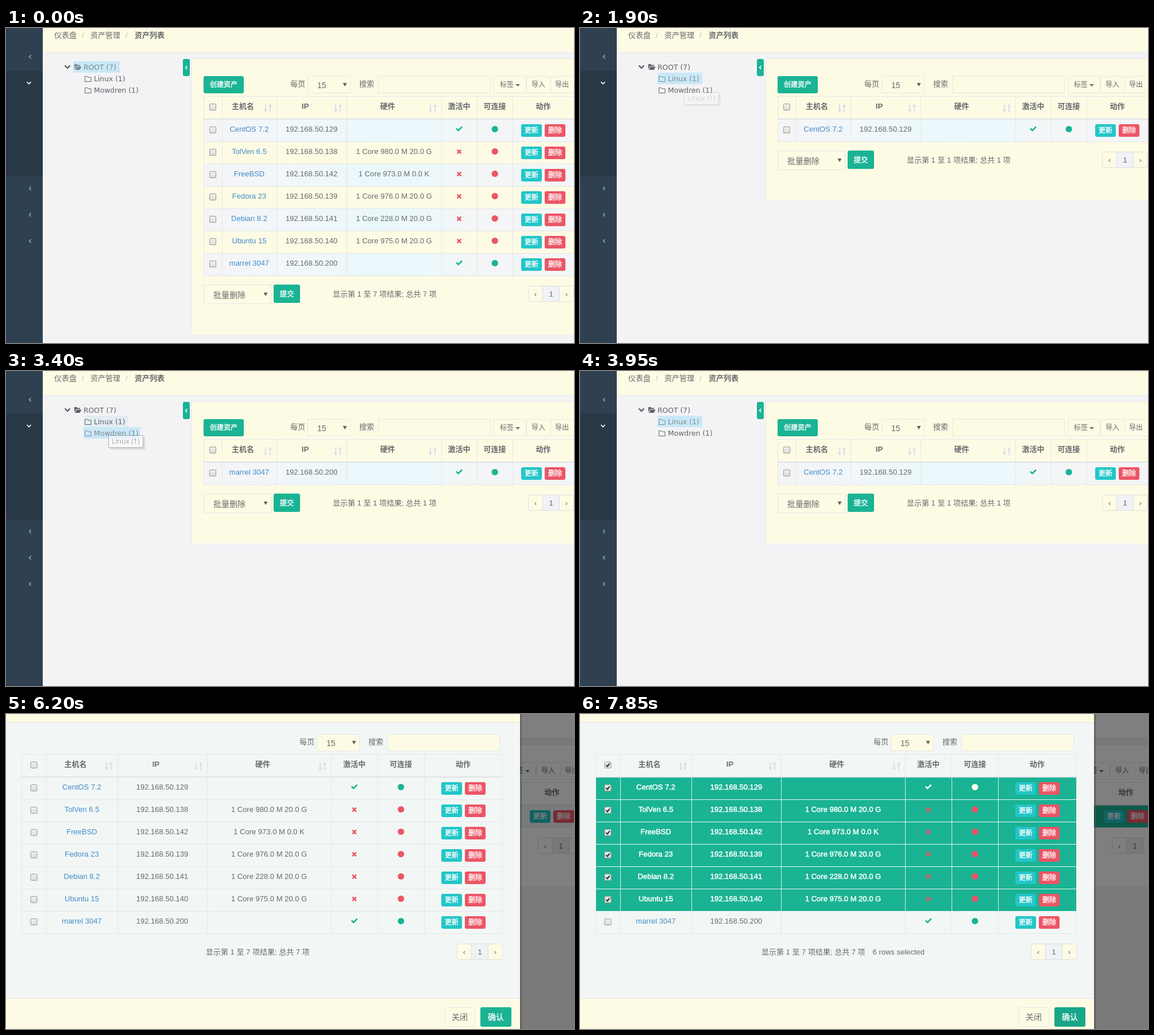
These frames come from a looping animation (989x550 px, 8000 ms). An HTML page:

```html
<!DOCTYPE html>
<html lang="zh">
<head>
<meta charset="utf-8">
<title>资产列表</title>
<style>
html, body { margin: 0; width: 100%; height: 100%; overflow: hidden; background: #f3f3f5; }
svg { display: block; width: 989px; height: 550px; }
text { font-family: 'Liberation Sans', 'Noto Sans CJK SC', 'Noto Sans CJK', sans-serif; white-space: pre; }
.tree { font-family: 'DejaVu Sans', sans-serif; }
.tip { font-family: 'Open Sans', sans-serif; }
.icon { fill: none; stroke-width: 2; }
</style>
</head>
<body>
<svg viewBox="0 0 989 550" xmlns="http://www.w3.org/2000/svg">
  <defs>
    <linearGradient id="stripe">
      <stop offset="0" stop-color="#f5f4f7"/><stop offset=".25" stop-color="#f0f7fa"/>
      <stop offset=".45" stop-color="#ebf8fb"/><stop offset=".63" stop-color="#ecf8fb"/>
      <stop offset=".7" stop-color="#f3f5f6"/><stop offset="1" stop-color="#f3f5f6"/>
    </linearGradient>
    <linearGradient id="check" x2="0" y2="1">
      <stop offset="0" stop-color="#f1f0ea"/><stop offset="1" stop-color="#dcdcda"/>
    </linearGradient>
  </defs>
  <g id="stage"></g>
</svg>
<script>
const LOOP = 8000, STEP = 50;
const GREEN = '#1ab394', CYAN = '#23c6c8', RED = '#ed5565', GREY = '#676a6c', LINE = '#e4e7ea';
const MAIN_COLS = [344, 376, 471, 593, 758, 820, 882, 989];
const MODAL_COLS = [27, 70, 194, 350, 566, 647, 728, 864];
const HEADS = ['主机名', 'IP', '硬件', '激活中', '可连接', '动作'];
const core = (ram, disk) => `1 Core ${ram} M ${disk}`;
const HOSTS = [
  ['CentOS 7.2', 129, '', true],
  ['TolVen 6.5', 138, core('980.0', '20.0 G')],
  ['FreeBSD', 142, core('973.0', '0.0 K')],
  ['Fedora 23', 139, core('976.0', '20.0 G')],
  ['Debian 8.2', 141, core('228.0', '20.0 G')],
  ['Ubuntu 15', 140, core('975.0', '20.0 G')],
  ['marrel 3047', 200, '', true]
];
const NODES = [
  { label: 'ROOT (7)', x: 117, w: 81 },
  { label: 'Linux (1)', x: 135, w: 78 },
  { label: 'Mowdren (1)', x: 135, w: 99 }
];
const MENU = [['创建资产', 117], ['添加资产到节点', 152], ['新建节点', 192], ['重命名节点', 227], ['删除节点', 267]];

// [start time, value] lists; the last one reached holds
const SELECTED = [[0, 0], [1750, 1], [2700, 2], [3750, 1]];
const LOADED = [[0, 0], [1800, 1], [2750, 2], [3800, 1]];
const HOVER = [[0, 0], [750, 1], [850, 2], [1050, 1], [2200, 2], [2950, 1], [4800, -1]];
const ITEM = [[0, -1], [4800, 0], [5000, -1], [5050, 1]];
const at = (list, t) => list.filter(e => e[0] <= t).pop()[1];

let cream = '#fdfbe4';

const rect = (x, y, w, h, fill, extra = '') =>
  `<rect x="${x}" y="${y}" width="${w}" height="${h}" fill="${fill}" ${extra}/>`;
const box = (x, y, w, h, fill, stroke = LINE, r = 0) =>
  rect(x + .5, y + .5, w - 1, h - 1, fill, `stroke="${stroke}" rx="${r}"`);
const path = (d, stroke, extra = '') => `<path class="icon" d="${d}" stroke="${stroke}" ${extra}/>`;
const shape = (d, fill) => `<path d="${d}" fill="${fill}"/>`;
const text = (x, cy, s, size = 13, fill = GREY, extra = '') =>
  `<text x="${x}" y="${Math.round(cy + size * .37)}" font-size="${size}" fill="${fill}" ${extra}>${s}</text>`;
const mid = (x, cy, s, size, fill, extra = '') => text(x, cy, s, size, fill, 'text-anchor="middle" ' + extra);
const group = (dx, dy, s) => `<g transform="translate(${dx} ${dy})">${s}</g>`;
const button = (x, y, w, h, s, fill, size = 12) =>
  rect(x, y, w, h, fill, 'rx="3"') + mid(x + w / 2, y + h / 2, s, size, '#fff', 'stroke="#fff" stroke-width=".35"');
const down = (x, y, fill = '#5c5f61') => shape(`M${x - 3.5} ${y - 3}h7l-3.5 6z`, fill);
const left = (x, y, stroke, s = 3) => path(`M${x + s / 2} ${y - s}l${-s} ${s} ${s} ${s}`, stroke, 'style="stroke-width:1.5"');

function checkbox(cx, cy, on, hover) {
  return box(cx - 6, cy - 6, 12, 12, 'url(#check)', hover ? '#7a7a78' : '#9a9a98', 1.5) +
    (on ? path(`M${cx - 3} ${cy}l2.3 2.7 4-5.5`, '#333') : '');
}

function sortIcon(x, y) {
  return path(`M${x - 4} ${y - 7}v11M${x + 4} ${y + 7}v-11`, '#dcdfe8') +
    shape(`M${x - 7.5} ${y + 2.5}h7l-3.5 5zM${x + .5} ${y - 2.5}h7l-3.5 -5z`, '#dcdfe8');
}

const tick = (x, y, c) => path(`M${x - 4.8} ${y - .5}l3.4 3.4 6.4-6.4`, c, 'style="stroke-width:2.6"');
const cross = (x, y, c) => path(`M${x - 3.3} ${y - 2.3}l6.6 6.6m0-6.6l-6.6 6.6`, c, 'style="stroke-width:2.6"');

function table(cols, top, hosts, o) {
  const c = i => (cols[i] + cols[i + 1]) / 2;
  const x0 = cols[0], wide = cols[7] - x0, first = top + 40, end = first + hosts.length * 39;
  const actions = Math.floor(c(6));
  let s = '';
  hosts.forEach((h, i) => {
    const y = first + i * 39;
    if (o.picked(i)) s += rect(x0, y, wide, 39, GREEN);
    else if (o.striped && i % 2 === 0) s += rect(x0, y, wide, 39, 'url(#stripe)');
  });
  s += rect(x0, top, wide, 1, LINE);
  cols.forEach(x => s += rect(x, top, 1, end - top, LINE));
  s += rect(x0, first - 1, wide, 2, '#dfe3e6') + checkbox(c(0), top + 19, o.all, o.headHover);
  HEADS.forEach((h, i) => {
    s += mid(c(i + 1) - (i < 3 ? 11 : 0), top + 17, h, 13, GREY, 'font-weight="bold"');
    if (i < 3) s += sortIcon(cols[i + 2] - 15, top + 21);
  });
  hosts.forEach(([name, ip, hw, up], i) => {
    const y = first + i * 39, on = o.picked(i), state = up ? (on ? '#fffdf0' : GREEN) : RED;
    const bold = on ? 'stroke="#fff" stroke-width=".5"' : '';
    const put = (k, v, fill) => mid(c(k), y + 17, v, 13, on ? '#fff' : fill, bold);
    s += rect(x0, y + 39, wide, 1, on ? '#eef6f2' : LINE) +
      checkbox(c(0), y + 19, on, i === 6 && o.lastHover) +
      put(1, name, '#428bca') + put(2, '192.168.50.' + ip, GREY) + put(3, hw, GREY) +
      (up ? tick : cross)(c(4), y + 17, state) +
      `<circle cx="${c(5) + .2}" cy="${y + 17.5}" r="5.6" fill="${state}"/>` +
      button(actions - 38, y + 9, 36, 22, '更新', CYAN) + button(actions + 3, y + 9, 36, 22, '删除', RED);
  });
  return s;
}

const filters = () => text(495, 97, '每页') + box(525, 84, 75, 30, cream) + text(542, 100, '15', 14) + down(590, 99) +
  text(615, 97, '搜索') + box(648, 84, 196, 30, cream);

const pager = (x, y) => box(x, y, 80, 28, cream, '#dde0e4', 3) + rect(x + 26, y + 1, 28, 26, '#f0f2f5') +
  rect(x + 25, y, 1, 28, '#dde0e4') + rect(x + 54, y, 1, 28, '#dde0e4') +
  mid(x + 13, y + 14, '‹') + mid(x + 40, y + 14, '1') + mid(x + 67, y + 14, '›');

const info = (x, y, n, tail = '') => text(x, y, `显示第 1 至 ${n} 项结果; 总共 ${n} 项`) + tail;

function sidebar() {
  return rect(0, 0, 64, 550, '#2f4050') + rect(0, 75, 64, 184, '#293846') +
    [50, 280, 326, 372].map(y => left(42, y, '#8fa9c4')).join('') +
    path('M36.5 94l3.5 3.5 3.5-3.5', '#fff', 'style="stroke-width:1.7"');
}

function tree(t) {
  const sel = at(SELECTED, t), hov = at(HOVER, t);
  let s = path('M102.500 65.500l4.500 4.500 4.500-4.500', '#5b5f62', 'style="stroke-width:2.4"');
  NODES.forEach((n, i) => {
    const y = 58 + i * 20, ink = i === sel ? '#7b8a91' : '#5f6365';
    if (i === sel) s += rect(n.x, y, n.w, 20, '#c9e8f7');
    else if (i === hov) s += rect(n.x, y, n.w, 20, '#e3edf2');
    s += i
      ? path(`M137.500 ${y + 6.5}h4l1.500 1.500h5v7.500h-10.500z`, ink, 'style="stroke-width:1"')
      : shape(`M119 ${y + 14}v-9h4l1.500 1.500h4.500v2h-6.500zM120 ${y + 15}l3-5.500h8.500l-3 5.500z`, ink);
    s += text(i ? 153 : 135, y + 10, n.label, 12.35, ink, 'class="tree"');
  });
  return s;
}

function page(t, modal, picked) {
  const load = at(LOADED, t);
  const hosts = load === 0 ? HOSTS : load === 1 ? HOSTS.slice(0, 1) : HOSTS.slice(6);
  const drop = (hosts.length - 7) * 39, dx = modal ? 17 : 0;
  const crumb = (x, s, extra) => text(x, 12, s, 13, GREY, extra);
  return rect(0, 0, 989, 550, '#f3f3f5') + rect(64, 0, 925, 42, cream) + rect(64, 42, 925, 1, '#e7eaec') +
    crumb(84, '仪表盘') + crumb(147, '资产管理') + crumb(224, '资产列表', 'font-weight="bold"') +
    text(132, 12, '/', 13, '#bbb') + text(208, 12, '/', 13, '#bbb') +
    sidebar() + tree(t) +
    rect(323, 53, 666, 482 + drop, '#e5e8ea') + rect(324, 54, 665, 481 + drop, cream) +
    rect(308, 54, 12, 30, GREEN, 'rx="3"') + left(314, 69, '#fff') +
    button(344, 84, 70, 30, '创建资产', GREEN) + filters() +
    group(dx, 0, box(849, 84, 57, 30, cream, LINE, 3) + text(860, 99, '标签', 12) + shape('M887 98h8l-4 4z', GREY) +
      box(906, 84, 43, 30, cream, LINE, 3) + box(948, 84, 42, 30, cream, LINE, 3) +
      text(915, 99, '导入', 12) + text(956, 99, '导出', 12)) +
    group(modal ? 15 : 0, 0, table(MAIN_COLS, 119, hosts, { striped: true, picked: () => picked })) +
    group(0, drop, box(344, 448, 118, 34, cream) + text(361, 466, '批量删除', 14) + down(452, 465) +
      button(466, 448, 46, 32, '提交', GREEN, 12.5) + info(569, 464, hosts.length) + group(dx, 0, pager(909, 450)));
}

function tip(x, y, w, label, alpha) {
  if (alpha <= 0) return '';
  return `<g opacity="${alpha}">` + rect(x + 3, y + 3, w, 22, '#000', 'opacity=".22"') + box(x, y, w, 22, '#fff', '#767676') +
    text(x + 6, y + 10.5, label, 12.3, '#575757', 'class="tip"') + '</g>';
}

function tips(t) {
  const fade = (a, b, peak, len) =>
    t < a ? 0 : t < b ? Math.min(peak, (t - a + STEP) / 200) : Math.max(0, peak - (t - b + STEP) * peak / len);
  return tip(181, 112, 61, NODES[1].label, fade(1450, 1750, 1, 250)) +
    tip(186, 131, 85, NODES[2].label, fade(2600, 2700, .75, 200)) +
    tip(178, 112, 61, NODES[1].label, fade(3350, 3750, 1, 250));
}

function menu(t) {
  const hot = at(ITEM, t);
  let s = rect(175, 99, 163, 192, '#000', 'rx="4" opacity=".08"') + box(175, 98, 162, 191, cream, '#cfcfd6', 4) +
    rect(176, 173, 160, 1, LINE) + rect(176, 248, 160, 1, LINE);
  if (hot >= 0) s += rect(180, 103 + hot * 35, 152, 31, '#f7f5ee', 'rx="3"');
  if (t >= 5300) s += rect(176.5, 138, 160, 31, '#fbf9ee', 'stroke="#86a9ea" stroke-width="1.6"');
  MENU.forEach(([label, y], i) => s += text(200, y, label, 12, i === hot ? '#262626' : GREY));
  return s;
}

function dialog(t) {
  const all = t >= 6300, count = t >= 7200 ? 6 : 7;
  const headHover = t >= 6050 && t < 6200, lastHover = t >= 6850 && t < 7050;
  return rect(895, 0, 3, 550, '#000', 'opacity=".2"') + rect(0, 0, 895, 550, cream) +
    rect(0, 14, 895, 483, '#f2f7f5') +
    rect(0, 14, 895, 1, '#e5e5e8') + rect(0, 496, 895, 1, '#e5e5e8') +
    group(16, -49, filters()) +
    table(MODAL_COLS, 70, HOSTS, { picked: i => all && i < count, all, headHover, lastHover }) +
    (all ? info(316, 415, 7, text(509.5, 415, count + ' rows selected')) : info(348, 415, 7)) +
    pager(785, 401) +
    box(763, 512, 54, 34, cream, t >= 7800 && t < 7850 ? '#d2d2d2' : LINE, 3) + mid(790, 529, '关闭', 14) +
    button(826, 512, 54, 34, '确认', t >= 7850 ? '#18a689' : GREEN, 14);
}

function scene(t) {
  const modal = t >= 5450;
  cream = modal ? '#fff' : '#fdfbe4';
  const back = page(t, modal, t >= 6300);
  if (!modal) return back + tips(t) + (t >= 4600 ? menu(t) : '');
  cream = '#fdfbe4';
  return back + rect(0, 0, 989, 550, '#000', 'opacity=".5"') + dialog(t);
}

const stage = document.getElementById('stage');
const start = performance.now();
let shown = -1;

function frame() {
  const t = Math.floor((performance.now() - start) % LOOP / STEP) * STEP;
  if (t !== shown) {
    shown = t;
    stage.innerHTML = scene(t);
  }
  requestAnimationFrame(frame);
}
frame();
</script>
</body>
</html>
```
